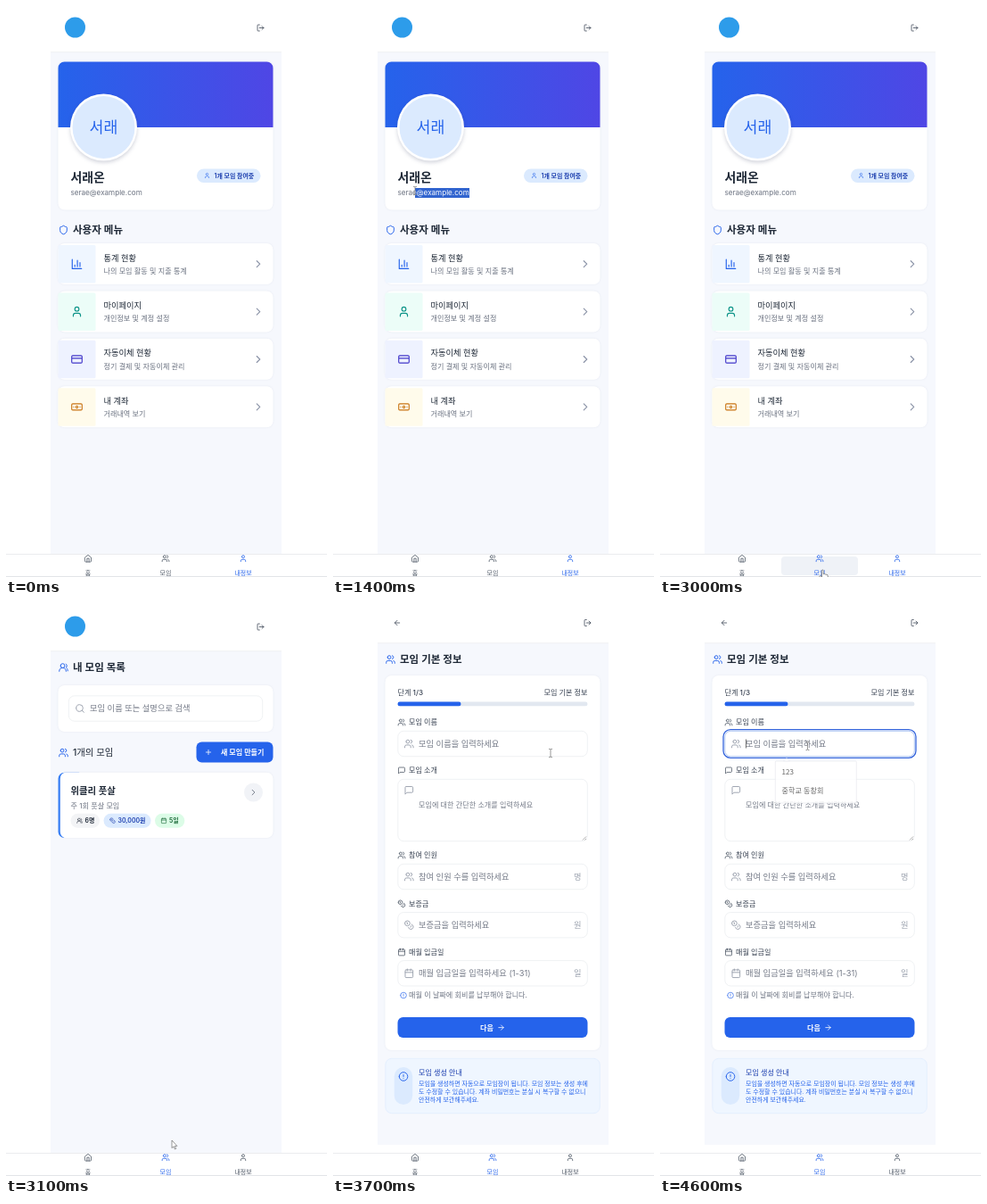
Animation of 360 by 640 pixels, one loop 5 s. Source, as an HTML page:

```html
<!DOCTYPE html>
<html lang="ko">
<head>
<meta charset="utf-8">
<style>
  html, body { margin: 0; width: 100%; height: 100%; overflow: hidden; background: #fff; }
  svg { display: block; width: 360px; height: 640px; }
  text { font-family: Inter, "Noto Sans CJK KR", "Noto Sans CJK", sans-serif; white-space: pre; }
  .plain { font-family: "Noto Sans CJK KR", "Noto Sans CJK", sans-serif; }
  .card { filter: drop-shadow(0 .6px .9px rgba(30, 41, 80, .07)); }
  .lift { filter: drop-shadow(0 2px 2px rgba(30, 41, 80, .2)); }
</style>
</head>
<body>
<svg id="stage" viewBox="0 0 360 640"></svg>
<script>
const BLUE = '#2563eb', INK = '#1f2937', MID = '#374151', GRAY = '#6b7280', PALE = '#9ca3af', LINE = '#e5e7eb';
const XS = 6.94, SM = 8.1, MD = 9.25, LG = 10.4, XL = 11.56;
const LOOP = 5000, STEP = 100;
const stage = document.getElementById('stage');

const ring = (x, y, r) => `M${x - r} ${y}a${r} ${r} 0 1 0 ${2 * r} 0a${r} ${r} 0 1 0 ${-2 * r} 0`;
const box = (x, y, w, h) => `M${x + 2} ${y}h${w - 4}a2 2 0 0 1 2 2v${h - 4}a2 2 0 0 1-2 2h${4 - w}a2 2 0 0 1-2-2v${4 - h}a2 2 0 0 1 2-2`;

// Icons on a 24 unit grid
const ICONS = {
  shield: 'M20 13c0 5-3.5 7.5-8 9-4.5-1.5-8-4-8-9V6a1 1 0 0 1 1-1c2 0 4.5-1.2 7-3 2.500 1.800 5 3 7 3a1 1 0 0 1 1 1z',
  chart: 'M3 3v18h18M8 17v-3M13 17V5M18 17V9',
  user: 'M19 21v-2a4 4 0 0 0-4-4H9a4 4 0 0 0-4 4v2' + ring(12, 7, 4),
  users: 'M16 21v-2a4 4 0 0 0-4-4H6a4 4 0 0 0-4 4v2M22 21v-2a4 4 0 0 0-3-3.87M16 3.13a4 4 0 0 1 0 7.75' + ring(9, 7, 4),
  pair: 'M18 21a8 8 0 0 0-16 0M22 20c0-3.370-2-6.500-4-8a5 5 0 0 0-.45-8.300' + ring(10, 8, 5),
  card: box(2, 5, 20, 14) + 'M2 10h20',
  note: box(2, 6, 20, 12) + ring(12, 12, 2) + 'M6 12h.01M18 12h.01',
  home: 'M3 9l9-7 9 7v11a2 2 0 0 1-2 2H5a2 2 0 0 1-2-2zM9 22V12h6v10',
  exit: 'M9 21H5a2 2 0 0 1-2-2V5a2 2 0 0 1 2-2h4M16 17l5-5-5-5M21 12H9',
  search: ring(11, 11, 8) + 'M21 21l-4.3-4.3',
  plus: 'M5 12h14M12 5v14',
  coins: ring(8, 8, 6) + 'M18.1 10.4A6 6 0 1 1 10.3 18M7 6h1v4M16.7 13.9l.7.7-2.800 2.800',
  date: box(3, 4, 18, 18) + 'M16 2v4M8 2v4M3 10h18',
  talk: 'M21 15a2 2 0 0 1-2 2H7l-4 4V5a2 2 0 0 1 2-2h14a2 2 0 0 1 2 2z',
  back: 'M12 19l-7-7 7-7M19 12H5',
  next: 'M5 12h14M12 5l7 7-7 7',
  info: ring(12, 12, 10) + 'M12 8v4M12 16h.01',
  more: 'M9 18l6-6-6-6'
};

const icon = (name, cx, cy, size, color) =>
  `<path d="${ICONS[name]}" transform="translate(${cx - size / 2} ${cy - size / 2}) scale(${size / 24})" fill="none" stroke="${color}" stroke-width="2" stroke-linecap="round" stroke-linejoin="round"/>`;
const text = (x, y, s, size, color, weight = 400, more = '') =>
  `<text x="${x}" y="${y}" font-size="${size}" fill="${color}" font-weight="${weight}" ${more}>${s}</text>`;
const rect = (x, y, w, h, r, fill, more = '') =>
  `<rect x="${x}" y="${y}" width="${w}" height="${h}" rx="${r}" fill="${fill}" ${more}/>`;
const disc = (x, y, r, fill, more = '') => `<circle cx="${x}" cy="${y}" r="${r}" fill="${fill}" ${more}/>`;
const panel = (y, h, cls = 'card') => rect(58.5, y, 241, h, 7, '#fff', `class="${cls}"`);
const MIDDLE = 'text-anchor="middle"', END = 'text-anchor="end"';

// Pointer path: time, x, y, shape
const PATH = [
  [500, 338, 452, 'arrow'], [600, 292, 434, 'hand'], [700, 246, 385, 'hand'], [800, 205, 306, 'hand'],
  [900, 172.5, 267, 'hand'], [1000, 150, 224, 'arrow'], [1200, 156, 211, 'beam'], [1300, 122, 210, 'beam'],
  [1400, 92, 207, 'beam'], [1500, 68, 193, 'beam'], [1600, 57, 186, 'arrow'], [1700, 57, 187, 'arrow'],
  [2200, 134.5, 227, 'arrow'], [2400, 136, 234, 'arrow'], [2500, 148, 250, 'arrow'], [2600, 170, 500, 'arrow'],
  [2700, 182, 632, 'arrow'], [2900, 182, 632, 'hand'], [3000, 181.5, 632, 'hand'], [3100, 186, 600, 'arrow'],
  [3300, 213, 330, 'arrow'], [3400, 222.5, 230, 'hand'], [3500, 236, 190, 'hand'], [3600, 245, 168, 'hand'],
  [3700, 244, 166, 'beam'], [3900, 240, 166, 'beam'], [4000, 238, 166, 'beam'], [4300, 168, 158, 'beam'],
  [4400, 165.5, 158, 'beam']
];

function pointer(t) {
  if (t < PATH[0][0]) return null;
  let i = PATH.length - 1;
  while (PATH[i][0] > t) i--;
  const a = PATH[i], b = PATH[i + 1] || a;
  const k = a === b ? 0 : (t - a[0]) / (b[0] - a[0]);
  return { x: a[1] + (b[1] - a[1]) * k, y: a[2] + (b[2] - a[2]) * k, shape: a[3] };
}

const SHAPES = {
  arrow: '<path d="M0 0v8.600l2-1.700 1.400 3.100 1.300-.6-1.400-3h2.600z" fill="#fff" stroke="#555" stroke-width=".6"/>',
  hand: '<path d="M0 1.200q0-1.200.9-1.200t.9 1.200v3.600q1.400-.6 1.800.3 1.300-.5 1.700.4 1.400-.3 1.400 1v2q0 1.400-1 3.300H.4q-1.500-1.700-2.900-4.300 0-1.300 1.300-.7L0 8z" fill="#fff" stroke="#555" stroke-width=".65" stroke-linejoin="round"/>',
  beam: '<path d="M-2-4.700q2 0 2 .8 0-.8 2-.8M0-4v8M-2 4.700q2 0 2-.8 0 .8 2 .8" fill="none" stroke="#777" stroke-width=".75"/>'
};

function cursor(t) {
  const p = pointer(t);
  return p ? `<g transform="translate(${p.x} ${p.y})">${SHAPES[p.shape]}</g>` : '';
}

const MENU = [
  ['chart', '#eff6ff', BLUE, '통계 현황', '나의 모임 활동 및 지출 통계'],
  ['user', '#ecfdf8', '#0d9488', '마이페이지', '개인정보 및 계정 설정'],
  ['card', '#eef2ff', '#4338ca', '자동이체 현황', '정기 결제 및 자동이체 관리'],
  ['note', '#fffbeb', '#c97516', '내 계좌', '거래내역 보기']
];
const menuY = i => 266 + 53.4 * i;

function hover(i, t) {
  const over = time => {
    const p = pointer(time), y = menuY(i);
    return p && p.x > 58 && p.x < 300 && p.y > y - 1 && p.y < y + 46 ? .5 : 0;
  };
  return over(t) + over(t - STEP);
}

function menuItem([name, tint, color, title, sub], i, t) {
  const y = menuY(i), level = hover(i, t);
  return `<g transform="translate(0 ${-1.16 * level})">` +
    panel(y, 46, level ? 'lift' : 'card') + rect(58.5, y + 2, 42, 42.5, 1.5, tint) +
    icon(name, 79.5, y + 23.2, 13.9, color) +
    text(109.5, y + 19.5, title, MD, INK, 500) + text(109.5, y + 34, sub, SM, GRAY) +
    icon('more', 283, y + 23.2, 13.9, '#8b93a7') + '</g>';
}

function identity(t) {
  const name = '서래온', mail = 'serae@example.com';
  const plain = text(72.5, 197, name, 13.9, INK, 700) + text(72.5, 212, mail, SM, GRAY);
  if (t < 1300 || t >= 2300) return plain;
  const p = pointer(t), both = t >= 1500;
  const nameX = t >= 1600 ? 72 : p.x + 8, mailX = both ? 72 : p.x;
  const areas = (both ? rect(nameX, 183, 114 - nameX, 18, 0, '#3164cf') : '') +
    rect(mailX, 204, 153 - mailX, 11, 0, '#3164cf');
  return plain + `<clipPath id="sel">${areas}</clipPath>` + areas + '<g clip-path="url(#sel)">' +
    text(72.5, 197, name, 13.9, '#fff', 700) + text(72.5, 212, mail, SM, '#fff') + '</g>';
}

function profile(t) {
  return panel(62.5, 166, 'card') +
    '<path d="M58.500 136V69.500a7 7 0 0 1 7-7h227a7 7 0 0 1 7 7V136z" fill="url(#sky)"/>' +
    disc(109.5, 136, 37.5, '#fff', 'class="lift"') + disc(109.5, 136, 35, '#dbeafe') +
    text(109.5, 142.3, '서래', 17.3, BLUE, 400, MIDDLE) + identity(t) +
    rect(214, 182.5, 71.5, 15.5, 7.75, '#dbeafe') + icon('user', 225.5, 190, 7, BLUE) +
    text(233.5, 192.7, '1개 모임 참여중', XS, '#1e40af', 600) +
    icon('shield', 64.5, 251, 11.5, BLUE) + text(75, 255.2, '사용자 메뉴', XL, INK, 600) +
    MENU.map((m, i) => menuItem(m, i, t)).join('');
}

function badge(x, w, fill, color, name, s) {
  return rect(x, 233.8, w, 16, 8, fill) + icon(name, x + 10, 241.7, 7, color) +
    text(x + 16, 244.2, s, XS, color, 600);
}

function clubs(t) {
  return icon('pair', 64.5, 70, 11.5, BLUE) + text(75, 74.2, '내 모임 목록', XL, INK, 600) +
    panel(90, 52) + rect(70.3, 101.8, 217.4, 28.4, 6.5, '#fff', `stroke="${LINE}" stroke-width=".6"`) +
    icon('search', 83, 116, 11.5, PALE) + text(94, 119.3, '모임 이름 또는 설명으로 검색', MD, '#757b88') +
    icon('users', 64.5, 165.5, 11.5, BLUE) + text(75, 169.2, '1개의 모임', LG, INK, 500) +
    rect(213.5, 153.5, 86, 23, 6, t === 3600 ? '#1d4ed8' : BLUE) + icon('plus', 227, 165, 9, '#fff') +
    text(241, 168, '새 모임 만들기', SM, '#fff', 700) +
    rect(58.5, 187.7, 30, 73.3, 7, '#3b82f6') +
    '<path class="card" d="M65.500 187.700h227a7 7 0 0 1 7 7v59.300a7 7 0 0 1-7 7h-227q-4.700-2-4.700-7v-59.300q0-5 4.700-7" fill="#fff"/>' +
    text(72.5, 211.5, '위클리 풋살', LG, INK, 600) + text(72.5, 228, '주 1회 풋살 모임', SM, GRAY) +
    badge(72.5, 32.5, '#f3f4f6', INK, 'pair', '6명') +
    badge(109.5, 53, '#dbeafe', '#1e40af', 'coins', '30,000원') +
    badge(167, 33.3, '#dcfce7', '#166534', 'date', '5일') +
    disc(277.5, 210, 10.5, '#f1f3f7') + icon('more', 277.5, 210, 11, GRAY);
}

// Fields: label y, icon, label, input y, height, hint, unit
const FIELDS = [
  [131.5, 'users', '모임 이름', 141.3, 28.4, '모임 이름을 입력하세요', ''],
  [185.5, 'talk', '모임 소개', 195.3, 69.4, '', ''],
  [280.5, 'users', '참여 인원', 290.3, 28.4, '참여 인원 수를 입력하세요', '명'],
  [334.8, 'coins', '보증금', 344.5, 28.4, '보증금을 입력하세요', '원'],
  [389, 'date', '매월 입금일', 398.6, 28.4, '매월 입금일을 입력하세요 (1-31)', '일']
];

function field([ly, name, label, y, h, hint, unit]) {
  const mid = y + (h > 30 ? 12.5 : h / 2);
  return icon(name, 77, ly, 9.25, '#4b5563') + text(85, ly + 2.9, label, SM, MID, 500) +
    rect(72.8, y, 212.5, h, 6.5, '#fff', `stroke="${LINE}" stroke-width=".6"`) +
    icon(name, 85.3, mid, 11.5, PALE) + text(96, mid + 3.2, hint, MD, '#757b88') +
    text(278.5, mid + 3.2, unit, MD, PALE, 400, END);
}

function suggestions() {
  const item = (y, s) => text(136.5, y, s, 8.1, '#666', 400, 'class="plain"');
  return rect(129.3, 175, 91, 47, 1, '#fff', 'fill-opacity=".85" stroke="#e3e5ea" stroke-width=".6"') +
    '<path d="M138.500 175l3.500-3.500 3.500 3.500z" fill="#fff" stroke="#e3e5ea" stroke-width=".5"/>' +
    item(190.3, '123') + item(211.3, '중학교 동창회');
}

function form(t) {
  const focus = rect(71, 139.6, 216, 31.8, 8, 'none', 'stroke="#3565dc" stroke-width="1.3"') +
    rect(72.8, 141.3, 212.5, 28.4, 6.5, 'none', 'stroke="#9dbcf7" stroke-width=".7"') +
    rect(96, 150.5, .7, 10, 0, '#333');
  const notice = ['모임을 생성하면 자동으로 모임장이 됩니다. 모임 정보는 생성 후에',
    '도 수정할 수 있습니다. 계좌 비밀번호는 분실 시 복구할 수 없으니', '안전하게 보관해주세요.'];
  return icon('users', 64.5, 61, 11.5, BLUE) + text(75, 65.2, '모임 기본 정보', XL, INK, 600) +
    panel(79, 420) + text(72.5, 101, '단계 1/3', SM, MID, 500) + text(285.5, 101, '모임 기본 정보', SM, MID, 500, END) +
    rect(72.5, 108.6, 213, 4.6, 2.3, '#e2e8f0') + rect(72.5, 108.6, 71, 4.6, 2.3, BLUE) +
    FIELDS.map(field).join('') + text(96, 227.4, '모임에 대한 간단한 소개를 입력하세요', SM, '#757b88') +
    '<path d="M280 263.500l4-4M282.500 263.500l1.500-1.500" stroke="#777" stroke-width=".6"/>' +
    icon('info', 79, 437.5, 8, BLUE) + text(85, 440.4, '매월 이 날짜에 회비를 납부해야 합니다.', SM, GRAY) +
    rect(72.5, 462, 213, 23, 6, BLUE) + text(165, 476.6, '다음', SM, '#fff', 700) + icon('next', 188.5, 473.6, 9.25, '#fff') +
    rect(58.8, 508.3, 240.5, 61.4, 7, '#eff6ff', 'stroke="#dbeafe" stroke-width=".6"') +
    rect(68.7, 518, 20.5, 42, 10.25, '#dbeafe') + icon('info', 79, 528.5, 11.5, BLUE) +
    text(96, 526.8, '모임 생성 안내', SM, '#1e40af', 500) +
    notice.map((s, i) => text(96, 538.6 + 9.25 * i, s, XS, BLUE)).join('') +
    (t >= 4400 ? focus : '') + (t >= 4500 ? suggestions() : '');
}

function frame(t) {
  const onForm = t >= 3700, top = onForm ? 43 : 52;
  return rect(50, top, 259, 562, 0, '#f6f8fd') + rect(50, top - .5, 259, .6, 0, LINE) +
    (onForm ? icon('back', 72, 20, 9.25, MID) : disc(77.5, 24, 11.5, '#2d9cea')) +
    icon('exit', 285.5, onForm ? 20 : 24.5, 9.25, MID);
}

function nav(t) {
  const clubOn = t >= 3000, meOn = t < 3100;
  const tab = (x, name, s, on) => icon(name, x, 619.2, 9.25, on ? BLUE : '#4b5563') +
    text(x, 637.7, s, XS, on ? BLUE : '#4b5563', 400, MIDDLE);
  const glow = t >= 2900 && t < 3100 ? rect(136, 617, 86, 21, 4, '#eff2f7', `opacity="${clubOn ? 1 : .5}"`) : '';
  return rect(0, 614, 360, 26, 0, '#fff') + rect(0, 614, 360, .7, 0, '#e2e4e8') + glow +
    tab(92, 'home', '홈', false) + tab(179, 'users', '모임', clubOn) + tab(266, 'user', '내정보', meOn) +
    rect(0, 639, 360, 1, 0, '#e2e4e8');
}

const DEFS = `<defs><linearGradient id="sky"><stop stop-color="${BLUE}"/><stop offset="1" stop-color="#4f46e5"/></linearGradient></defs>`;
let shown = -1;

function draw() {
  const t = Math.floor(performance.now() % LOOP / STEP) * STEP;
  if (t !== shown) {
    shown = t;
    const page = t < 3100 ? profile : t < 3700 ? clubs : form;
    stage.innerHTML = DEFS + frame(t) + page(t) + nav(t) + cursor(t);
  }
  requestAnimationFrame(draw);
}
draw();
</script>
</body>
</html>
```
